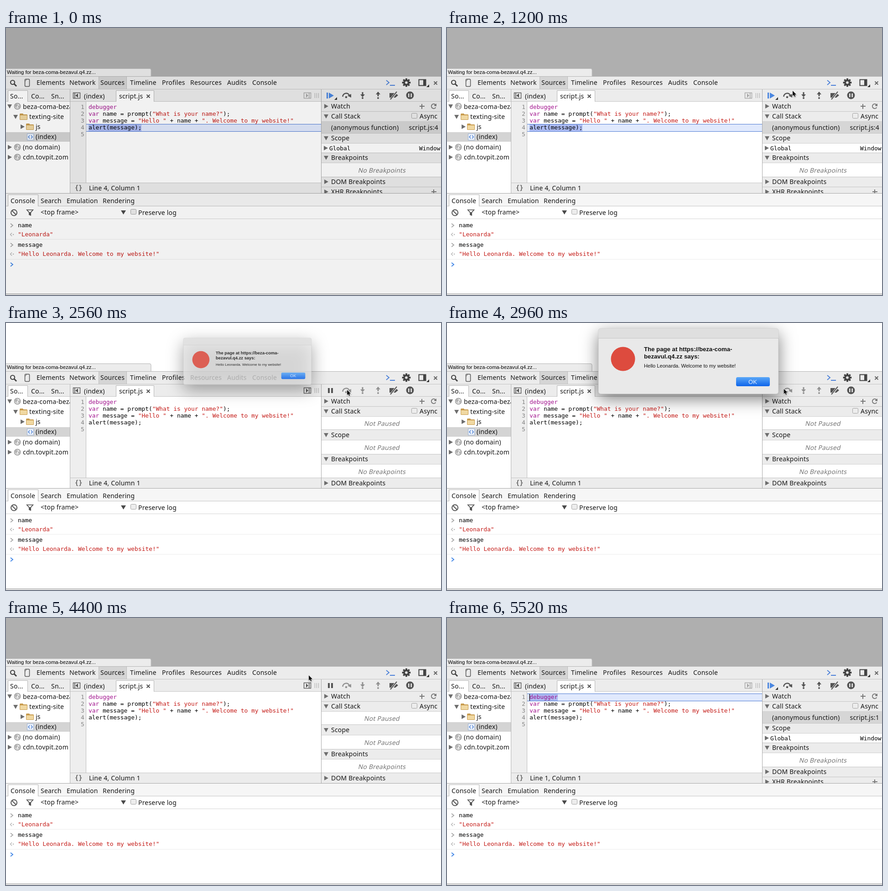
Recreate the animation shown at these times as an HTML page with a canvas. Size 954 px wide and 587 px high, loop 5920 ms.

```html
<!DOCTYPE html>
<html lang="en">
<head>
<meta charset="utf-8">
<title>Stepping through a script</title>
<style>
html, body { margin: 0; width: 100%; height: 100%; overflow: hidden; background: #fff; }
canvas { display: block; width: 954px; height: 587px; }
</style>
</head>
<body>
<canvas id="stage" width="954" height="587"></canvas>
<script>
const ctx = document.getElementById('stage').getContext('2d');
const LOOP = 5920, TICK = 80;
const HOST = 'beza-coma-bezavul.q4.zz';
const PERSON = 'Leonarda';
const GREETING = `Hello ${PERSON}. Welcome to my website!`;
const UI = '14px "Noto Sans", sans-serif';
const MONO = '12.9px "DejaVu Sans Mono", monospace';
const ARIAL = '"Liberation Sans", Arial, sans-serif';
const INK = '#141414', ICON = '#555', BAR = '#ececec', RULE = '#c4c4c4';

// Pointer path: time, x, y
const PATH = [
  [400, 806, 572], [960, 775, 227], [1200, 758, 138], [1440, 748, 147],
  [2880, 748, 147], [3600, 664, 126], [4800, 664, 126], [5440, 640, 590]
];

function box(x, y, w, h, color) {
  ctx.fillStyle = color;
  ctx.fillRect(x, y, w, h);
}

function frame(x, y, w, h, color, line = 1) {
  ctx.strokeStyle = color;
  ctx.lineWidth = line;
  ctx.strokeRect(x + 0.5, y + 0.5, w - 1, h - 1);
}

function write(str, x, y, font, color, space = 0) {
  ctx.font = font;
  ctx.letterSpacing = space + 'px';
  ctx.fillStyle = color;
  ctx.fillText(str, x, y);
}

// y is the middle of the capitals
const label = (str, x, y, color = INK) => write(str, x, y + 5, UI, color, 0.2);
const code = (str, x, y, color = '#000') => write(str, x, y + 4, MONO, color);

function poly(points, color) {
  ctx.beginPath();
  points.forEach(([x, y]) => ctx.lineTo(x, y));
  ctx.closePath();
  ctx.fillStyle = color;
  ctx.fill();
}

function line(points, color, width = 2) {
  ctx.beginPath();
  points.forEach(([x, y]) => ctx.lineTo(x, y));
  ctx.strokeStyle = color;
  ctx.lineWidth = width;
  ctx.stroke();
}

function disc(x, y, r, color) {
  ctx.beginPath();
  ctx.arc(x, y, r, 0, 7);
  ctx.fillStyle = color;
  ctx.fill();
}

function arc(x, y, r, from, to, color, width = 2) {
  ctx.beginPath();
  ctx.arc(x, y, r, from, to);
  ctx.strokeStyle = color;
  ctx.lineWidth = width;
  ctx.stroke();
}

function clipped(x, y, w, h, draw) {
  ctx.save();
  ctx.beginPath();
  ctx.rect(x, y, w, h);
  ctx.clip();
  draw();
  ctx.restore();
}

function twisty(x, y, open) {
  poly(open ? [[x - 5, y - 4], [x + 5, y - 4], [x, y + 5]]
            : [[x - 4, y - 5], [x + 5, y], [x - 4, y + 5]], '#6e6e6e');
}

function cross(x, y, r, color = ICON, width = 2) {
  line([[x - r, y - r], [x + r, y + r]], color, width);
  line([[x - r, y + r], [x + r, y - r]], color, width);
}

function plus(x, y) {
  box(x - 5, y - 1, 11, 2, '#777');
  box(x - 1, y - 5, 2, 11, '#777');
}

function checkbox(x, y) {
  ctx.beginPath();
  ctx.roundRect(x + 0.5, y + 0.5, 12, 11, 2);
  ctx.fillStyle = '#ededed';
  ctx.fill();
  ctx.strokeStyle = '#a0a0a0';
  ctx.lineWidth = 1;
  ctx.stroke();
}

function tab(x, y, w, h) {
  box(x, y, w, h, '#fff');
  line([[x + 0.5, y + h], [x + 0.5, y + 0.5], [x + w - 0.5, y + 0.5], [x + w - 0.5, y + h]], '#b4b4b4', 1);
}

function page(dark) {
  box(0, 0, 954, 587, '#fff');
  if (dark) box(0, 0, 954, 107, '#afafaf');
  ctx.beginPath();
  ctx.roundRect(-2, 89.5, 320, 20, [0, 3, 0, 0]);
  ctx.fillStyle = '#ececec';
  ctx.fill();
  ctx.strokeStyle = dark ? '#c2c2c2' : '#b2b2b2';
  ctx.lineWidth = 1;
  ctx.stroke();
  write(`Waiting for ${HOST}...`, 2, 101, '11.3px ' + ARIAL, '#000');
}

function mainBar() {
  box(0, 106, 954, 29, BAR);
  box(0, 106, 954, 1, '#b5b5b5');
  box(203, 107, 62, 27, '#d5d5d5');
  box(203, 107, 1, 27, '#bcbcbc');
  box(264, 107, 1, 27, '#bcbcbc');
  box(0, 134, 954, 1, RULE);
  const names = { Elements: 67, Network: 139, Sources: 207, Timeline: 272, Profiles: 342,
    Resources: 404, Audits: 485, Console: 540 };
  for (const name in names) label(name, names[name], 120);

  arc(14.5, 119.5, 4.5, 0, 7, '#444', 2.2);
  line([[18, 123], [23, 128]], '#444', 3);
  ctx.beginPath();
  ctx.roundRect(41.5, 112.5, 10, 16, 2);
  ctx.strokeStyle = ICON;
  ctx.lineWidth = 1.5;
  ctx.stroke();
  line([[42, 117], [46, 112.5]], ICON, 1);

  line([[834, 115], [840, 120], [834, 125]], '#4a7fd8', 1.8);
  box(842, 125, 11, 2, '#4a7fd8');
  for (let i = 0; i < 8; i++) {
    const a = i * Math.PI / 4, c = Math.cos(a), s = Math.sin(a);
    line([[878 + c * 5, 120 + s * 5], [878 + c * 9.3, 120 + s * 9.3]], '#444', 4);
  }
  arc(878, 120, 4.8, 0, 7, '#444', 4);
  frame(905, 113, 16, 14, '#444', 2);
  box(915, 113, 6, 14, '#444');
  poly([[928, 124], [928, 130], [922, 130]], '#333');
  cross(942, 121, 3.5, '#666');
}

function globe(y) {
  disc(25, y, 7, '#e4e4e4');
  arc(25, y, 6.7, 0, 7, '#8b8b8b', 1.2);
  poly([[20, y - 3], [24, y - 5], [26, y - 2], [23, y], [24, y + 4], [20, y + 1]], '#b0b0b0');
  poly([[27, y - 1], [31, y - 2], [29, y + 4], [27, y + 3]], '#b0b0b0');
}

function folder(x, y) {
  ctx.beginPath();
  ctx.roundRect(x, y - 7, 8, 6, 1.5);
  ctx.roundRect(x, y - 5, 17, 12, 1.5);
  ctx.fillStyle = '#c89b4e';
  ctx.fill();
  box(x + 1, y - 3, 15, 9, '#f0d8a2');
}

function tree() {
  box(0, 135, 140, 27, BAR);
  box(0, 161, 140, 1, RULE);
  tab(4, 137, 44, 25);
  label('So...', 9, 150);
  label('Co...', 55, 150);
  label('Sn...', 99, 150);
  box(0, 229, 140, 21, '#d4d4d4');
  clipped(0, 162, 140, 201, () => {
    twisty(8, 172, true); globe(172); label(HOST, 37, 173);
    twisty(21, 195, true); folder(30, 195); label('texting-site', 51, 195);
    twisty(36, 217, false); folder(44, 217); label('js', 65, 217);
    box(46, 232, 15, 15, '#eef3fb');
    frame(46, 232, 15, 15, '#9ab0d0');
    line([[52, 236], [49, 239.5], [52, 243]], '#3f78d0', 1.4);
    line([[55, 236], [58, 239.5], [55, 243]], '#3f78d0', 1.4);
    label('(index)', 65, 239);
    twisty(8, 262, false); globe(262); label('(no domain)', 37, 262);
    twisty(8, 284, false); globe(284); label('cdn.tovpit.zom', 37, 284);
  });
}

function stepFrame(x, flip, color) {
  frame(x, 142, 16, 13, color, 1.4);
  const [a, b] = flip ? [x + 11, x + 5] : [x + 5, x + 10];
  poly([[a, 144], [b, 148.5], [a, 153]], color);
  box(flip ? x + 3 : x + 11, 143, 1.5, 11, color);
}

function editor(paused, current) {
  box(140, 135, 551, 27, BAR);
  box(140, 161, 551, 1, RULE);
  tab(241, 137, 84, 25);
  stepFrame(147, true, ICON);
  label('(index)', 171, 150);
  label('script.js', 248, 150);
  cross(312, 150, 3.5, '#555');
  stepFrame(653, false, paused ? '#a5a5a5' : ICON);
  for (let i = 0; i < 3; i++) box(677 + i * 4, 143, 1, 11, '#aaa');

  box(140, 162, 35, 178, '#eeeeee');
  box(175, 162, 1, 178, '#bdbdbd');
  if (current) {
    const y = 152 + current * 15;
    box(176, y, 515, 15, '#e0e9fd');
    box(176, y - 1, 515, 1, '#4b78d2');
    box(176, y + 15, 515, 1, '#4b78d2');
    box(181, y, current === 4 ? 116 : 62, 15, '#acbbf2');
    if (current === 1) box(180.5, y, 1.5, 15, '#222');
  }
  for (let i = 1; i < 6; i++) code(i, 164, 159 + i * 15, '#858585');
  const rows = [
    [['debugger', '#a0108c']],
    [['var', '#a0108c'], [' name = prompt('], ['"What is your name?"', '#c41a16'], [');']],
    [['var', '#a0108c'], [' message = '], ['"Hello "', '#c41a16'], [' + name + '],
      ['". Welcome to my website!"', '#c41a16']],
    [['alert(message);']]
  ];
  rows.forEach((row, i) => {
    let x = 181;
    for (const [str, color] of row) {
      code(str, x, 174 + i * 15, color);
      x += ctx.measureText(str).width;
    }
  });

  box(140, 340, 551, 23, BAR);
  box(140, 340, 551, 1, RULE);
  write('{}', 151, 356, 'bold 13.5px "DejaVu Sans Mono", monospace', '#666');
  label(`Line ${current || 4}, Column 1`, 182, 352);
  box(140, 135, 1, 228, '#b4b4b4');
}

function stepArrow(x, up, color) {
  const y = 147;
  box(x - 1.5, y - 6, 3, 9, color);
  poly(up ? [[x - 5, y - 1], [x + 5, y - 1], [x, y - 7]]
          : [[x - 5, y - 1], [x + 5, y - 1], [x, y + 5]], color);
  disc(x, y + 7, 2, color);
}

function debugBar(paused) {
  box(692, 135, 262, 27, BAR);
  const soft = paused ? ICON : '#929292';
  if (paused) {
    box(703, 142, 3, 13, '#4a86e0');
    poly([[708, 142], [719, 148.5], [708, 155]], '#4a86e0');
    poly([[726, 152], [726, 158], [720, 158]], '#333');
  } else {
    box(706, 143, 4, 11, '#555');
    box(713, 143, 4, 11, '#555');
  }
  arc(746, 151, 7.5, Math.PI, Math.PI * 1.85, soft, 2.5);
  poly([[749, 149], [757, 145], [757, 153]], soft);
  disc(746, 152, 2.3, soft);
  stepArrow(782, false, soft);
  stepArrow(816, true, soft);
  poly([[841, 143], [854, 143], [860, 148], [854, 153], [841, 153]], ICON);
  line([[843, 158], [858, 139]], BAR, 4.5);
  line([[843, 157], [857, 140]], ICON, 2);
  disc(886, 148, 8.5, ICON);
  box(882, 144, 2.5, 8, BAR);
  box(887.5, 144, 2.5, 8, BAR);
}

function section(name, y, h, open) {
  const mid = Math.floor(y + h / 2);
  box(692, y, 262, h, BAR);
  box(692, y, 262, 1, RULE);
  box(692, y + h - 1, 262, 1, '#d0d0d0');
  twisty(702, mid, open);
  label(name, 713, mid);
}

// Slanted upright letters, as for a face without its own italic
function note(str, y) {
  ctx.save();
  ctx.translate(825, y);
  ctx.transform(1, 0, -0.22, 1, 0, 0);
  ctx.textAlign = 'center';
  label(str, 0, 0, '#757575');
  ctx.restore();
}

function debugPane(paused, current) {
  debugBar(paused);
  section('Watch', 161, 23, false);
  plus(912, 172);
  arc(938, 172, 5, 0.5, 5.6, '#777', 2);
  poly([[944, 166], [944, 172], [938, 171]], '#777');
  section('Call Stack', 183, 23, true);
  checkbox(889, 187);
  label('Async', 907, 194);
  clipped(692, 206, 262, 157, () => {
    if (paused) {
      box(692, 206, 262, 25, '#d6d6d6');
      label('(anonymous function)', 713, 219);
      ctx.textAlign = 'right';
      label(`script.js:${current}`, 948, 219);
      ctx.textAlign = 'left';
      section('Scope', 231, 23, true);
      twisty(701, 264, false);
      code('Global', 709, 265);
      code('Window', 906, 265);
      section('Breakpoints', 274, 23, true);
      note('No Breakpoints', 313);
      section('DOM Breakpoints', 327, 23, false);
      section('XHR Breakpoints', 349, 23, false);
      plus(938, 360);
    } else {
      note('Not Paused', 221);
      section('Scope', 234, 24, true);
      note('Not Paused', 274);
      section('Breakpoints', 288, 23, true);
      note('No Breakpoints', 327);
      section('DOM Breakpoints', 340, 24, false);
    }
  });
  box(691, 135, 1, 228, '#a8a8a8');
}

function chevron(y, color) {
  line([[10, y - 4], [15, y], [10, y + 4]], color, 1.7);
}

function reply(str, y) {
  line([[13, y - 3.5], [9.5, y], [13, y + 3.5]], '#b5b5b5', 1.5);
  disc(16, y, 1.3, '#b5b5b5');
  code(`"${str}"`, 26, y, '#c41a16');
}

function consolePane() {
  box(0, 363, 954, 29, '#f6f6f6');
  box(0, 363, 954, 1, '#a6a6a6');
  box(0, 391, 954, 1, RULE);
  tab(4, 366, 67, 26);
  label('Console', 10, 380);
  label('Search', 76, 380);
  label('Emulation', 133, 380);
  label('Rendering', 212, 380);
  box(0, 419, 954, 1, '#d6d6d6');
  arc(17.5, 406, 6.5, 0, 7, ICON, 2);
  line([[13, 401.5], [22, 410.5]], ICON, 2);
  poly([[44, 399], [61, 399], [55, 406], [55, 413], [50, 411], [50, 406]], ICON);
  poly([[47.5, 400.5], [57.5, 400.5], [53.5, 405], [51.5, 405]], '#fff');
  label('<top frame>', 76, 405);
  poly([[252, 401], [263, 401], [257.5, 410]], '#4a4a4a');
  checkbox(273, 398);
  label('Preserve log', 290, 406);

  chevron(434, '#a5a5a5');
  code('name', 26, 434);
  reply(PERSON, 454);
  box(0, 464, 954, 1, '#ececec');
  chevron(477, '#a5a5a5');
  code('message', 26, 477);
  reply(GREETING, 497);
  box(0, 508, 954, 1, '#ececec');
  chevron(520, '#3b82e6');
  box(0, 584, 954, 1, '#8f8f8f');
  box(0, 585, 954, 2, '#ededed');
}

function panel(alpha) {
  const shape = () => {
    ctx.beginPath();
    ctx.roundRect(0, 0, 395, 144, 5);
  };
  ctx.save();
  ctx.globalAlpha = alpha;
  ctx.shadowColor = 'rgba(0,0,0,.5)';
  ctx.shadowBlur = 36;
  ctx.shadowOffsetY = 11;
  shape();
  ctx.fillStyle = '#e9e9e9';
  ctx.fill();
  ctx.shadowColor = 'transparent';
  ctx.strokeStyle = '#bdbdbd';
  ctx.lineWidth = 0.7;
  ctx.stroke();
  shape();
  ctx.clip();
  box(0, 0, 395, 21, '#dfdfdf');
  box(0, 21, 395, 1, '#c5c5c5');
  ctx.restore();
}

function dialog(x, y, scale, alpha, inkAlpha) {
  ctx.save();
  ctx.translate(x, y);
  ctx.scale(scale, scale);
  panel(alpha);
  ctx.globalAlpha = inkAlpha;
  disc(54, 67, 26.5, '#dd4b3e');
  const bold = 'bold 13.2px ' + ARIAL;
  write(`The page at https://${HOST.slice(0, 10)}`, 100, 50, bold, '#111');
  write(`${HOST.slice(10)} says:`, 100, 66, bold, '#111');
  write(GREETING, 100, 86, '11.1px ' + ARIAL, '#111');
  const blue = ctx.createLinearGradient(0, 107, 0, 127);
  blue.addColorStop(0, '#5ba8f8');
  blue.addColorStop(1, '#0d64ea');
  ctx.beginPath();
  ctx.roundRect(302, 107, 74, 20, 3.5);
  ctx.fillStyle = blue;
  ctx.fill();
  ctx.textAlign = 'center';
  write('OK', 338.5, 121.5, '13px ' + ARIAL, '#e8f1ff');
  ctx.restore();
}

function pointer(t) {
  if (t < PATH[0][0] || t >= PATH[PATH.length - 1][0]) return;
  const i = PATH.findIndex(key => key[0] > t);
  const [t0, x0, y0] = PATH[i - 1], [t1, x1, y1] = PATH[i];
  const k = (t - t0) / (t1 - t0);
  ctx.save();
  ctx.translate(x0 + (x1 - x0) * k, y0 + (y1 - y0) * k);
  ctx.shadowColor = 'rgba(0,0,0,.35)';
  ctx.shadowBlur = 2;
  ctx.shadowOffsetY = 1;
  const arrow = [[0, 0], [0, 11.5], [2.6, 9.2], [4.4, 13.2], [6.4, 12.3], [4.7, 8.4], [8.2, 8.2]];
  line([...arrow, arrow[0]], '#fff', 1.8);
  ctx.shadowColor = 'transparent';
  poly(arrow, '#111');
  ctx.restore();
}

function draw(now) {
  const t = Math.floor(now % LOOP / TICK) * TICK;
  const running = t >= 2560 && t < 4480;
  const open = t >= 2560 && t < 4400;
  const current = running ? 0 : t < 2560 ? 4 : 1;
  page(!open);
  mainBar();
  tree();
  editor(!running, current);
  debugPane(!running, current);
  consolePane();
  if (t === 2480) dialog(471, 64, 0.296, 0.3, 0.4);
  else if (t === 2560) dialog(389, 33, 0.711, 0.72, 0.85);
  else if (open) dialog(332, 12, 1, 1, 1);
  pointer(t);
  if (t < TICK) box(0, 0, 954, 587, 'rgba(0,0,0,.055)');
}

const start = performance.now();
function tick() {
  draw(performance.now() - start);
  requestAnimationFrame(tick);
}
tick();
</script>
</body>
</html>
```
